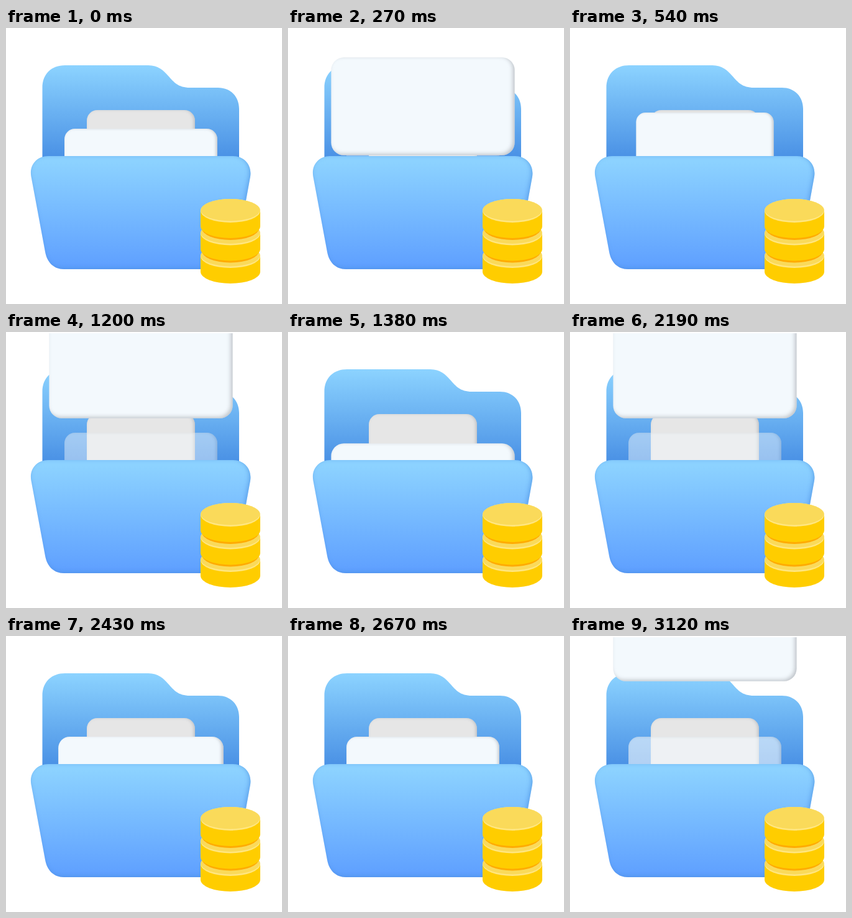
These frames come from a looping animation (444 px wide and 444 px high, 3.15 s). An HTML page:

```html
<!DOCTYPE html>
<html lang="en">
<head>
<meta charset="utf-8">
<title>Folder</title>
<style>
  html, body { margin: 0; width: 100%; height: 100%; overflow: hidden; background: #fff; }
  svg { display: block; width: 100%; height: 100%; }
</style>
</head>
<body>
<svg viewBox="0 0 444 444" xmlns="http://www.w3.org/2000/svg">
  <defs>
    <linearGradient id="backFill" gradientUnits="userSpaceOnUse" x1="0" y1="60" x2="0" y2="208">
      <stop offset="0" stop-color="#8cd3ff"/>
      <stop offset="1" stop-color="#4a91e5"/>
    </linearGradient>
    <linearGradient id="frontFill" gradientUnits="userSpaceOnUse" x1="0" y1="206" x2="0" y2="388">
      <stop offset="0.05" stop-color="#8cd2ff"/>
      <stop offset="1" stop-color="#5e9fff"/>
    </linearGradient>
    <filter id="paperShade" color-interpolation-filters="sRGB">
      <feFlood flood-color="#a9adb3" flood-opacity="0.7"/>
      <feComposite operator="out" in2="SourceAlpha"/>
      <feGaussianBlur stdDeviation="2.6"/>
      <feOffset dx="-2.5" dy="-1.5"/>
      <feComposite operator="in" in2="SourceAlpha" result="shade"/>
      <feMerge><feMergeNode in="SourceGraphic"/><feMergeNode in="shade"/></feMerge>
    </filter>
    <filter id="frontShade" color-interpolation-filters="sRGB">
      <feFlood flood-color="#4a8fe0" flood-opacity="0.65"/>
      <feComposite operator="out" in2="SourceAlpha"/>
      <feGaussianBlur stdDeviation="3.5"/>
      <feOffset dx="-2" dy="-2"/>
      <feComposite operator="in" in2="SourceAlpha" result="shade"/>
      <feMerge><feMergeNode in="SourceGraphic"/><feMergeNode in="shade"/></feMerge>
    </filter>
    <clipPath id="stage"><rect y="2" width="444" height="442"/></clipPath>
    <rect id="sheet" x="-123" y="-65.7" width="246" height="131.4" rx="17" fill="#f3f9fd" filter="url(#paperShade)"/>
    <g id="coin">
      <path d="M-48 0V25A48 19 0 0 0 48 25V0Z" fill="#ffcd00"/>
      <ellipse rx="48" ry="19" fill="#ffe680"/>
      <ellipse cy="-1.3" rx="47.6" ry="17.7" fill="#fada5a"/>
    </g>
    <ellipse id="coinShadow" rx="46" ry="19" fill="#ffab00"/>
  </defs>

  <path fill="url(#backFill)" d="M58.5 240V96C58.5 74 73 60 95 60H229C245 60 254 69 261 77C270 87 277 96 296 96H341C361 96 375 110 375 130V240Z"/>
  <rect x="130" y="132" width="174" height="150" rx="17" fill="#e6e6e6" filter="url(#paperShade)"/>
  <g clip-path="url(#stage)">
    <use id="oldSheet" href="#sheet"/>
    <use id="newSheet" href="#sheet"/>
  </g>
  <path fill="url(#frontFill)" filter="url(#frontShade)" d="M68 206H365C383 206 396 220 393 239L371 360C367 377 357 388 341 388H93C77 388 66 377 63 360L40.500 239C37 220 50 206 68 206Z"/>
  <use href="#coin" x="361" y="367"/>
  <use href="#coinShadow" x="361" y="358.500"/>
  <use href="#coin" x="361" y="330.500"/>
  <use href="#coinShadow" x="361" y="322"/>
  <use href="#coin" x="361" y="294"/>
</svg>
<script>
  const LOOP = 3150, CYCLE = 990, STEP = 30;
  const CENTER_X = 217, REST_Y = 227.7;

  // time in the cycle, centre y, scale
  const keys = [
    [0, -171, 1.2],
    [390, 258, 1.2],
    [540, 195.1, 0.9],
    [690, REST_Y, 1],
    [CYCLE, REST_Y, 1]
  ];

  const oldSheet = document.getElementById('oldSheet');
  const newSheet = document.getElementById('newSheet');
  const lerp = (a, b, k) => a + (b - a) * k;

  function place(el, y, scale) {
    el.setAttribute('transform', `translate(${CENTER_X} ${y}) scale(${scale})`);
  }

  function draw(ms) {
    const t = Math.floor((ms % LOOP) / STEP) * STEP % CYCLE;
    const i = keys.findIndex(key => key[0] > t);
    const a = keys[i - 1], b = keys[i];
    const k = (t - a[0]) / (b[0] - a[0]);
    place(newSheet, lerp(a[1], b[1], k), lerp(a[2], b[2], k));
    oldSheet.setAttribute('opacity', Math.max(0, 1 - t / 390));
  }

  place(oldSheet, REST_Y, 1);
  draw(0);
  let start;
  requestAnimationFrame(function tick(now) {
    start ??= now;
    draw(Math.max(0, now - start));
    requestAnimationFrame(tick);
  });
</script>
</body>
</html>
```
